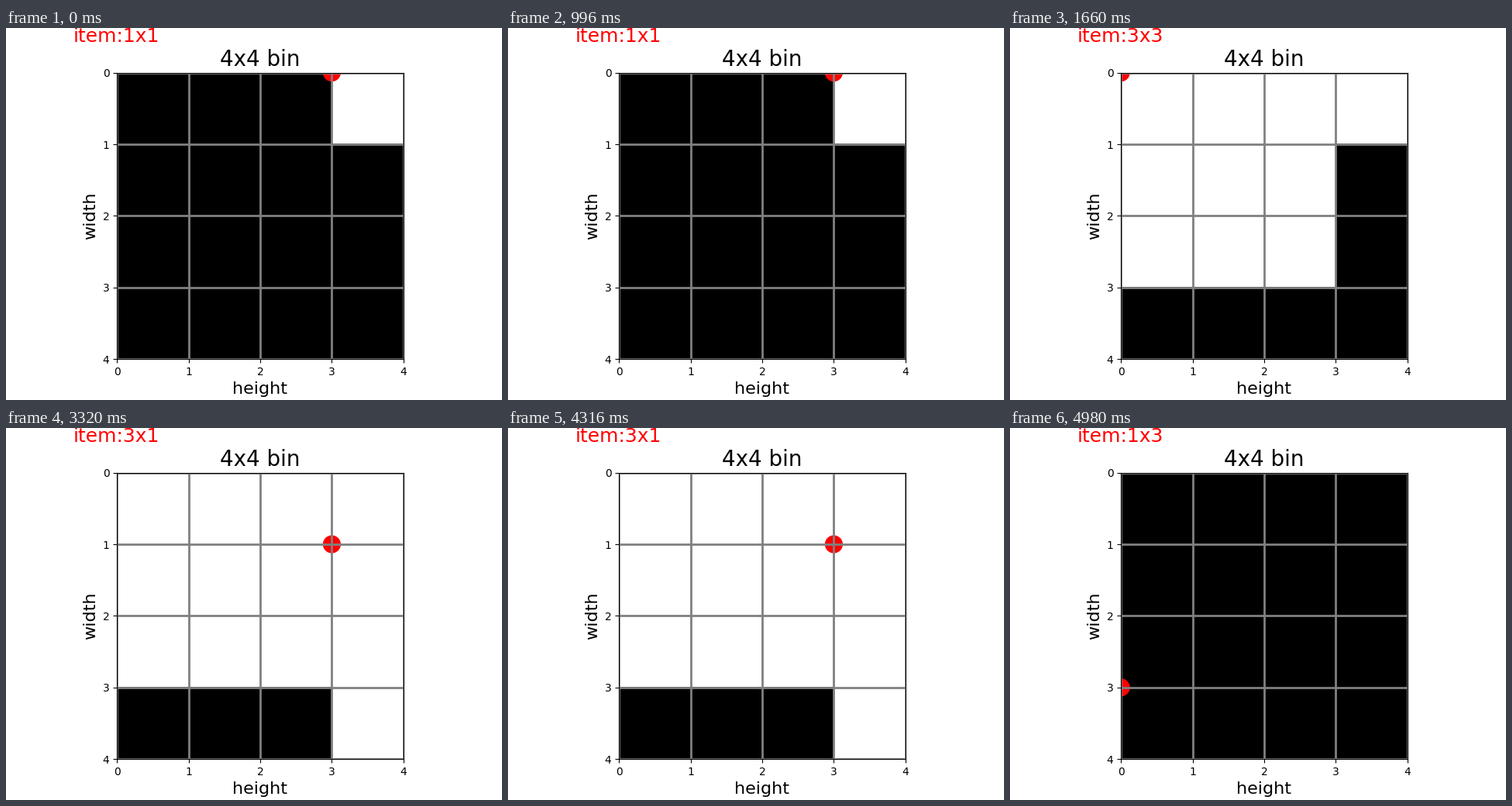
A matplotlib script for the animation above (6640 ms loop, 640 by 480 pixels).

```python
import matplotlib.pyplot as plt
import numpy as np
from matplotlib.animation import FuncAnimation
from matplotlib.patches import Circle

plt.rcParams["font.family"] = "DejaVu Sans"

SIZE = 4
STEP_MS = 1660
# (rows, columns, top row, left column) of each packed item
ITEMS = [(1, 1, 0, 3), (3, 3, 0, 0), (3, 1, 1, 3), (1, 3, 3, 0)]


def pack(count):
    """Occupancy after placing `count` items; a full bin is emptied."""
    cells = np.zeros((SIZE, SIZE))
    for rows, cols, top, left in ITEMS[:count]:
        cells[top:top + rows, left:left + cols] = 1
    return np.zeros_like(cells) if cells.all() else cells


fig, ax = plt.subplots(figsize=(6.4, 4.8), dpi=100)
image = ax.imshow(pack(0), cmap="gray", vmin=0, vmax=1,
                  interpolation="nearest", extent=(0, SIZE, SIZE, 0))
ax.set_xticks(range(SIZE + 1))
ax.set_yticks(range(SIZE + 1))
ax.grid(color="gray", linewidth=2)
ax.set_title(f"{SIZE}x{SIZE} bin", fontsize=20)
ax.set_xlabel("height", fontsize=16)
ax.set_ylabel("width", fontsize=16)

corner = ax.add_patch(Circle((0, 0), 0.125, facecolor="red", linewidth=0))
label = ax.text(-0.607, -0.43, "", color="red", fontsize=18)


def update(step):
    rows, cols, top, left = ITEMS[step]
    image.set_data(pack(step + 1))
    corner.center = (left, top)
    label.set_text(f"item:{rows}x{cols}")
    return image, corner, label


animation = FuncAnimation(fig, update, frames=len(ITEMS), interval=STEP_MS,
                          repeat=True, repeat_delay=0)
plt.show()
```
